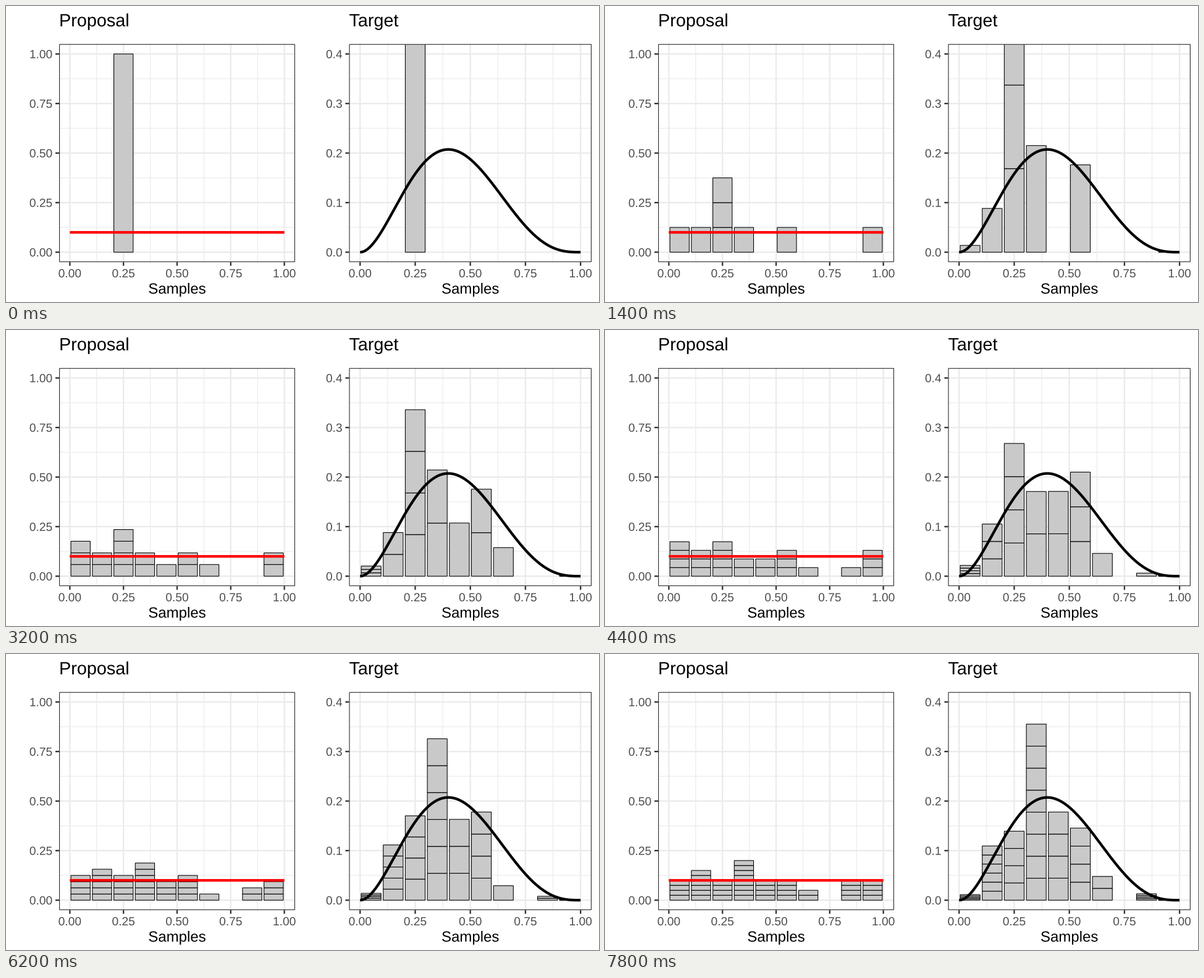
Animation, 960 px wide and 480 px high, one loop 8 s. Source, as a matplotlib script:

```python
import numpy as np
import matplotlib.pyplot as plt
from matplotlib.animation import FuncAnimation
from matplotlib.patches import PathPatch, Rectangle
from matplotlib.textpath import TextPath
from matplotlib.transforms import Affine2D

W, H, DPI = 960, 480, 100
PT = 72 / DPI  # points per pixel
TOP, BOTTOM = 61.7, 415.3
plt.rcParams["font.family"] = "Liberation Sans"
plt.rcParams["path.snap"] = False

# Bin (0-9) of each uniform draw, one draw per frame
DRAWS = [2, 3, 9, 1, 2, 2, 5, 0, 9, 2, 0, 5, 4, 1, 6, 3, 0, 1, 4, 8,
         0, 5, 9, 3, 1, 3, 5, 3, 4, 3, 8, 1, 3, 8, 1, 3, 6, 4, 8, 9]


def density(x):
    return 6 * x**2 * (1 - x)**3


fig = plt.figure(figsize=(W / DPI, H / DPI), dpi=DPI, facecolor="white")
ax = fig.add_axes([0, 0, 1, 1])
ax.set_xlim(0, W)
ax.set_ylim(H, 0)
ax.axis("off")


def line(x, y, color, width, z):
    ax.plot(x, y, color=color, lw=width * PT, zorder=z,
            solid_capstyle="butt")


def ink_right(text, size):
    return TextPath((0, 0), text, size=size).get_extents().x1


def label(x, y, text, size, align=0.5, color="black"):
    """Text on baseline y, aligned by its advance width (0 left, 1 right)."""
    advance = ink_right(text + "0", size) - ink_right("0", size)
    place = Affine2D().scale(1, -1).translate(x - align * advance, y)
    glyphs = TextPath((0, 0), text, size=size).transformed(place)
    ax.add_patch(PathPatch(glyphs, fc=color, lw=0, zorder=7))


class Panel:
    def __init__(self, left, right, title, ymax, fmt, weights):
        self.ymax, self.weights = ymax, weights
        self.x0 = left + (right - left) / 22
        self.dx = (right - left) / 1.1
        self.dy = (BOTTOM - TOP) / 1.1
        self.y0 = BOTTOM - self.dy / 20
        self.clip = Rectangle((left, TOP), right - left, BOTTOM - TOP,
                              transform=ax.transData)
        ax.add_patch(Rectangle((left + 0.58, TOP + 0.58), right - left - 1.16,
                               BOTTOM - TOP - 1.16, fill=False, ec="#333333",
                               lw=1.16 * PT, zorder=6))
        label(left, 33, title, 28.8, 0)
        label((left + right) / 2, 466.4, "Samples", 24)
        for i in range(9):
            x, y = self.x0 + self.dx * i / 8, self.y0 - self.dy * i / 8
            minor = i % 2
            grid = (1.16, 0) if minor else (2.33, 1)
            line([x, x], [TOP, BOTTOM], "#EBEBEB", *grid)
            line([left, right], [y, y], "#EBEBEB", *grid)
            if not minor:
                line([x, x], [BOTTOM, BOTTOM + 6], "#333333", 2.33, 1)
                line([left - 6, left], [y, y], "#333333", 2.33, 1)
                label(x, 440, f"{i / 8:.2f}", 19.2, color="#4D4D4D")
                label(left - 10.8, y + 6.9, fmt.format(ymax * i / 8), 19.2,
                      1, "#4D4D4D")
        self.bars = []
        for _ in DRAWS:
            bar = Rectangle((0, 0), 0, 0, fc="#C9C9C9", ec="black",
                            lw=1.07 * PT, zorder=3, visible=False)
            ax.add_patch(bar)
            bar.set_clip_path(self.clip)
            self.bars.append(bar)

    def px(self, x):
        return self.x0 + self.dx * x

    def py(self, y):
        return self.y0 - self.dy * y / self.ymax

    def curve(self, x, y, color):
        line(self.px(x), self.py(y), color, 4.27, 5)

    def show(self, n):
        total = sum(self.weights[b] for b in DRAWS[:n])
        stack = np.zeros(10)
        for i, (bar, b) in enumerate(zip(self.bars, DRAWS)):
            bar.set_visible(i < n)
            if i < n:
                h = self.weights[b] / total
                lo, hi = self.py(stack[b]), self.py(stack[b] + h)
                bar.set_bounds(self.px(b / 10 + 0.005), hi,
                               0.09 * self.dx, lo - hi)
                stack[b] += h


centers = np.arange(10) / 10 + 0.05
proposal = Panel(86, 468, "Proposal", 1.0, "{:.2f}", np.ones(10))
target = Panel(555.4, 948, "Target", 0.4, "{:.1f}", density(centers))

xs = np.linspace(0, 1, 201)
proposal.curve(xs, np.full_like(xs, 0.1), "red")
target.curve(xs, density(xs), "black")


def update(frame):
    for panel in (proposal, target):
        panel.show(frame + 1)
    return proposal.bars + target.bars


anim = FuncAnimation(fig, update, frames=len(DRAWS), interval=200,
                     init_func=lambda: update(0), repeat=True,
                     repeat_delay=0, blit=False)
plt.show()
```
